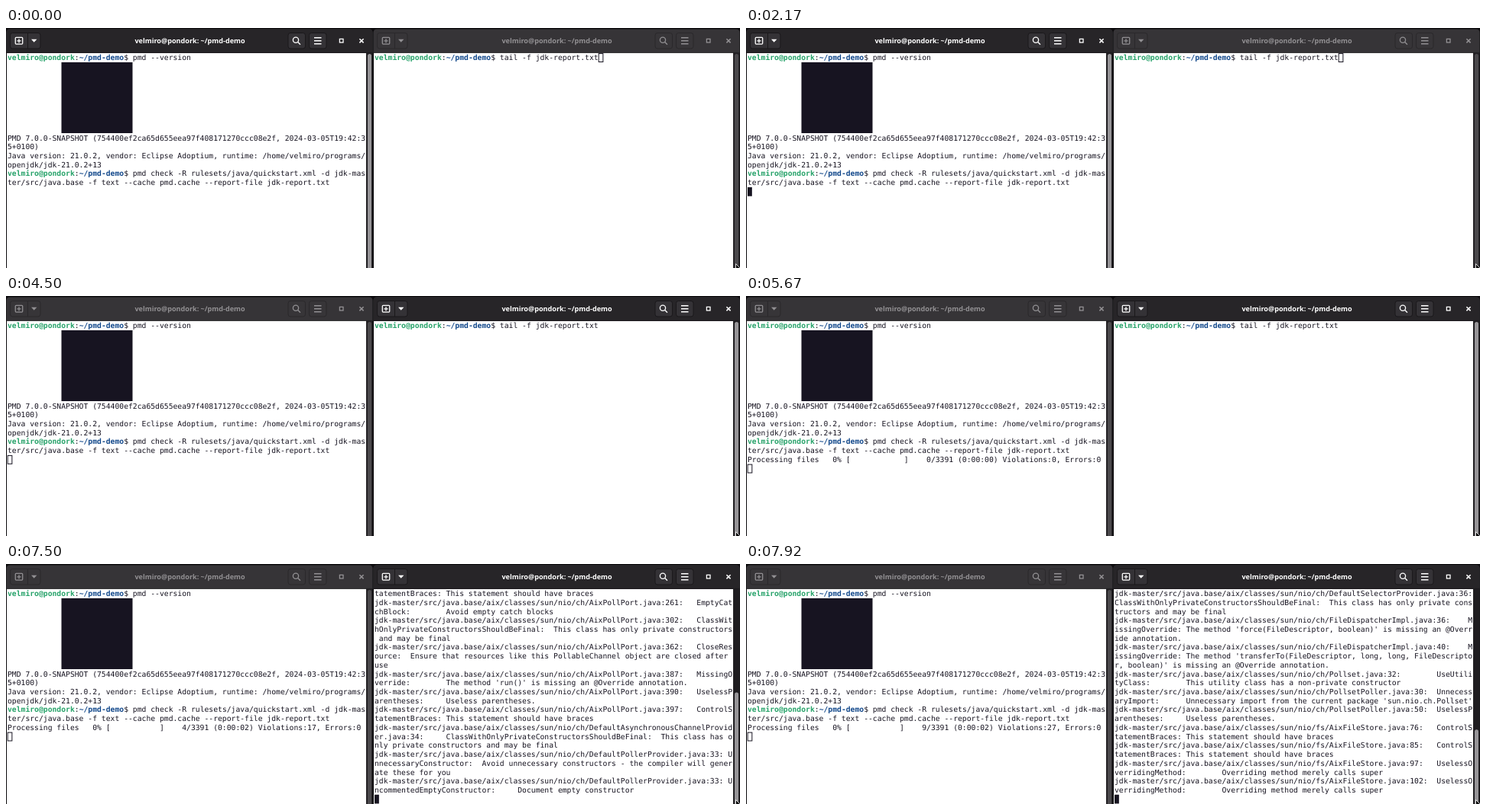
Write an HTML page that moves like this. It is 960 by 315 pixels and loops after 8 s.

```html
<!DOCTYPE html>
<html lang="en">
<head>
<meta charset="utf-8">
<title>Terminal demo</title>
<style>
  html, body { margin: 0; width: 100%; height: 100%; overflow: hidden; background: #0d0c0e; }
  svg { display: block; width: 960px; height: 315px; }
  text { white-space: pre; text-rendering: geometricPrecision; }
  .mono { font: 9.733px "DejaVu Sans Mono", monospace; fill: #171421; }
  .title { font: 700 9.1px "Open Sans", sans-serif; text-anchor: middle; }
  .user { font-weight: 700; fill: #26a269; }
  .path { font-weight: 700; fill: #12488b; }
</style>
</head>
<body>
<svg id="stage" viewBox="0 0 960 315"></svg>
<script>
const LOOP = 8000, COLS = 80, ROWS = 24;
const CELL_W = 5.86, CELL_H = 11.72, TOP = 33.2;
const FOCUS_AT = 2420, FADE = 200, ENTER_LEFT = 830, ENTER_RIGHT = 3830;
const HOST = 'velmiro@pondork';
const INK = '#171421';

const ACTIVE = { bar: '#272528', button: '#343236', edge: '#1a181b', ink: '#fff', track: '#1f1d20', thumb: '#979598' };
const IDLE = { bar: '#363437', button: '#373538', edge: '#2a282b', ink: '#929093', track: '#232124', thumb: '#4c4a4d' };

const prompt = command =>
  `<tspan class="user">${HOST}</tspan>:<tspan class="path">~/pmd-demo</tspan>$ ${command}`;

// Report: every file lists its violations as [line, rule, message].
const BRACES = ['ControlStatementBraces', 'This statement should have braces'];
const CONSTRUCTOR = ['UnnecessaryConstructor', 'Avoid unnecessary constructors - the compiler will generate these for you'];
const EMPTY = ['UncommentedEmptyConstructor', 'Document empty constructor'];
const FINAL = ['ClassWithOnlyPrivateConstructorsShouldBeFinal', 'This class has only private constructors and may be final'];
const PARENS = ['UselessParentheses', 'Useless parentheses.'];
const SUPER = ['UselessOverridingMethod', 'Overriding method merely calls super'];
const override = method => ['MissingOverride', `The method '${method}' is missing an @Override annotation.`];

const FILES = [
  ['ch/AixAsynchronousChannelProvider', [
    [38, 'AvoidUsingVolatile', 'Use of modifier volatile is not recommended.'],
    [51, ...CONSTRUCTOR], [51, ...EMPTY], [73, ...BRACES]]],
  ['ch/AixPollPort', [
    [94, 'UnusedAssignment', "The value assigned to field 'pollset' is never used (overwritten on lines 101, 117, 133, 149 and 165, so the first assignment can be removed from the class without effect)"],
    [133, 'PreserveStackTrace', "Thrown exception does not preserve the stack trace of exception 'x' on all code paths, pass it as the cause to the new exception so that the origin of the error stays visible"],
    [176, 'MissingStaticMethodInNonInstantiatableClass', 'Class cannot be instantiated and does not provide any static methods or fields'],
    [248, ...BRACES],
    [261, 'EmptyCatchBlock', 'Avoid empty catch blocks'],
    [302, ...FINAL],
    [362, 'CloseResource', 'Ensure that resources like this PollableChannel object are closed after use'],
    [387, ...override('run()')], [390, ...PARENS], [397, ...BRACES]]],
  ['ch/DefaultAsynchronousChannelProvider', [[34, ...FINAL]]],
  ['ch/DefaultPollerProvider', [[33, ...CONSTRUCTOR], [33, ...EMPTY]]],
  ['ch/DefaultSelectorProvider', [[36, ...FINAL]]],
  ['ch/FileDispatcherImpl', [
    [36, ...override('force(FileDescriptor, boolean)')],
    [40, ...override('transferTo(FileDescriptor, long, long, FileDescriptor, boolean)')]]],
  ['ch/Pollset', [[32, 'UseUtilityClass', 'This utility class has a non-private constructor']]],
  ['ch/PollsetPoller', [
    [30, 'UnnecessaryImport', "Unnecessary import from the current package 'sun.nio.ch.Pollset'"],
    [50, ...PARENS]]],
  ['fs/AixFileStore', [[76, ...BRACES], [85, ...BRACES], [97, ...SUPER], [102, ...SUPER]]]
];

// [time, files done, elapsed seconds]
const PROGRESS = [
  [5330, 0, 0], [6330, 0, 1], [6830, 1, 1], [7330, 2, 2], [7420, 3, 2],
  [7500, 4, 2], [7580, 5, 2], [7670, 6, 2], [7750, 8, 2], [7920, 9, 2]
];

// Terminal wrapping: 8-column tab stops, tabs never leave the last column.
function wrap(line) {
  const rows = [''];
  for (const char of line) {
    const last = rows.length - 1, col = rows[last].length;
    if (char === '\t') {
      if (col < COLS - 1) rows[last] = rows[last].padEnd(Math.min(COLS - 1, (col >> 3) * 8 + 8));
    } else if (col === COLS) rows.push(char);
    else rows[last] += char;
  }
  return rows;
}

const fileRows = ([name, issues]) => issues.flatMap(([line, rule, message]) =>
  wrap(`jdk-master/src/java.base/aix/classes/sun/nio/${name}.java:${line}:\t${rule}:\t${message}`));

function progressLine(done, seconds) {
  const violations = FILES.slice(0, done).reduce((sum, [, issues]) => sum + issues.length, 0);
  const bar = ' '.repeat(13 - String(violations).length);
  return `Processing files   0% [${bar}] ${String(done).padStart(4)}/3391 (0:00:0${seconds}) Violations:${violations}, Errors:0`;
}

const LEFT_ROWS = [
  prompt('pmd --version'), ...Array(8).fill(''),
  'PMD 7.0.0-SNAPSHOT (754400ef2ca65d655eea97f408171270ccc08e2f, 2024-03-05T19:42:3',
  '5+0100)',
  'Java version: 21.0.2, vendor: Eclipse Adoptium, runtime: /home/velmiro/programs/',
  'openjdk/jdk-21.0.2+13',
  prompt('pmd check -R rulesets/java/quickstart.xml -d jdk-mas'),
  'ter/src/java.base -f text --cache pmd.cache --report-file jdk-report.txt'
];

const rect = (x, y, w, h, fill, extra = '') =>
  `<rect x="${x}" y="${y}" width="${w}" height="${h}" fill="${fill}" ${extra}/>`;

function chrome(c, totalRows) {
  const thumbTop = 34 + 281 * (1 - ROWS / Math.max(ROWS, totalRows));
  const button = (x, w) => rect(x, 6.5, w, 20.5, c.button, `rx="3" stroke="${c.edge}"`);
  return `
    <path d="M.5 32.5V6q0-4.5 4.5-4.5H475q4.5 0 4.5 4.5V32.5z" fill="${c.bar}"/>
    ${rect(.5, 31.8, 479, .9, c.edge)}
    ${button(5.5, 39.5)}${button(369, 22.5)}${button(396.5, 22.5)}
    <path d="M28.5 7V27" stroke="${c.edge}"/>
    <g fill="none" stroke="${c.ink}" stroke-width="1.3">
      <rect x="12.3" y="12.3" width="9.4" height="8.8" rx="1"/>
      <path d="M17 14.2V19.4M14.4 16.8H19.6"/>
      <circle cx="379" cy="15.8" r="3.6"/><path d="M381.7 18.5L385 21.8"/>
      <path d="M403 12.7H412.5M403 16.7H412.5M403 20.7H412.5" stroke-width="1.5"/>
      <rect x="436.4" y="14.4" width="4.6" height="4.6"/>
      <path d="M462.4 14.2L467.6 19.4M467.6 14.2L462.4 19.4" stroke-width="1.5"/>
    </g>
    <path d="M33 14.8H40.4L36.7 18.8z" fill="${c.ink}"/>
    <text class="title" x="240.5" y="20" fill="${c.ink}">${HOST}: ~/pmd-demo</text>
    ${rect(471, 32.5, 8.5, 283, c.track)}
    ${rect(473, thumbTop, 5, 320 - thumbTop, c.thumb, 'rx="2.5"')}`;
}

// cursor: { row, col, on }; an unfocused terminal shows a steady hollow cursor.
function terminal(x, focus, focused, rows, cursor, extra = '') {
  const total = cursor.row + 1, first = Math.max(0, total - ROWS);
  const text = rows.slice(first).map((row, i) =>
    `<text class="mono" x="2" y="${TOP + 8.9 + i * CELL_H}">${row}</text>`).join('');
  const cx = 2 + cursor.col * CELL_W, cy = TOP + (cursor.row - first) * CELL_H;
  const block = !focused
    ? rect(cx + .2, cy + .4, CELL_W - .2, CELL_H - .8, 'none', `stroke="${INK}"`)
    : cursor.on ? rect(cx, cy, CELL_W, CELL_H, INK) : '';
  return `<g transform="translate(${x})">
    ${rect(1, 32.5, 470, 283, '#fff')}
    ${chrome(IDLE, total)}<g opacity="${focus}">${chrome(ACTIVE, total)}</g>
    ${extra}${text}${block}</g>`;
}

// A cursor starts hidden and flips at each given time.
const blink = (t, ...flips) => flips.filter(at => at <= t).length % 2 === 1;

function scene(t) {
  const fade = Math.min(1, Math.max(0, (t - FOCUS_AT) / FADE));
  const switched = t >= FOCUS_AT;
  const step = PROGRESS.filter(([at]) => at <= t).pop();

  const left = step ? [...LEFT_ROWS, progressLine(step[1], step[2])] : LEFT_ROWS;
  const leftCursor = t < ENTER_LEFT ? { row: 14, col: 72 } : { row: left.length, col: 0 };
  leftCursor.on = blink(t, 420, 1420, 2080);

  const right = [prompt('tail -f jdk-report.txt'), ...FILES.slice(0, step ? step[1] : 0).flatMap(fileRows)];
  const rightCursor = t < ENTER_RIGHT ? { row: 0, col: 50 } : { row: right.length, col: 0 };
  rightCursor.on = blink(t, FOCUS_AT, 3080, 3670, 4500, 5080, 5670, 6250, 6830, 7500);

  return terminal(0, 1 - fade, !switched, left, leftCursor, rect(72.5, 45, 93, 93, INK))
    + terminal(480, fade, switched, right, rightCursor)
    + '<path d="M954.5 309.5V318L961 316z" fill="#000" stroke="#fff" stroke-width=".8"/>';
}

const stage = document.getElementById('stage');
let shown = '';
function draw() {
  const markup = scene(performance.now() % LOOP);
  if (markup !== shown) stage.innerHTML = shown = markup;
  requestAnimationFrame(draw);
}
draw();
</script>
</body>
</html>
```
